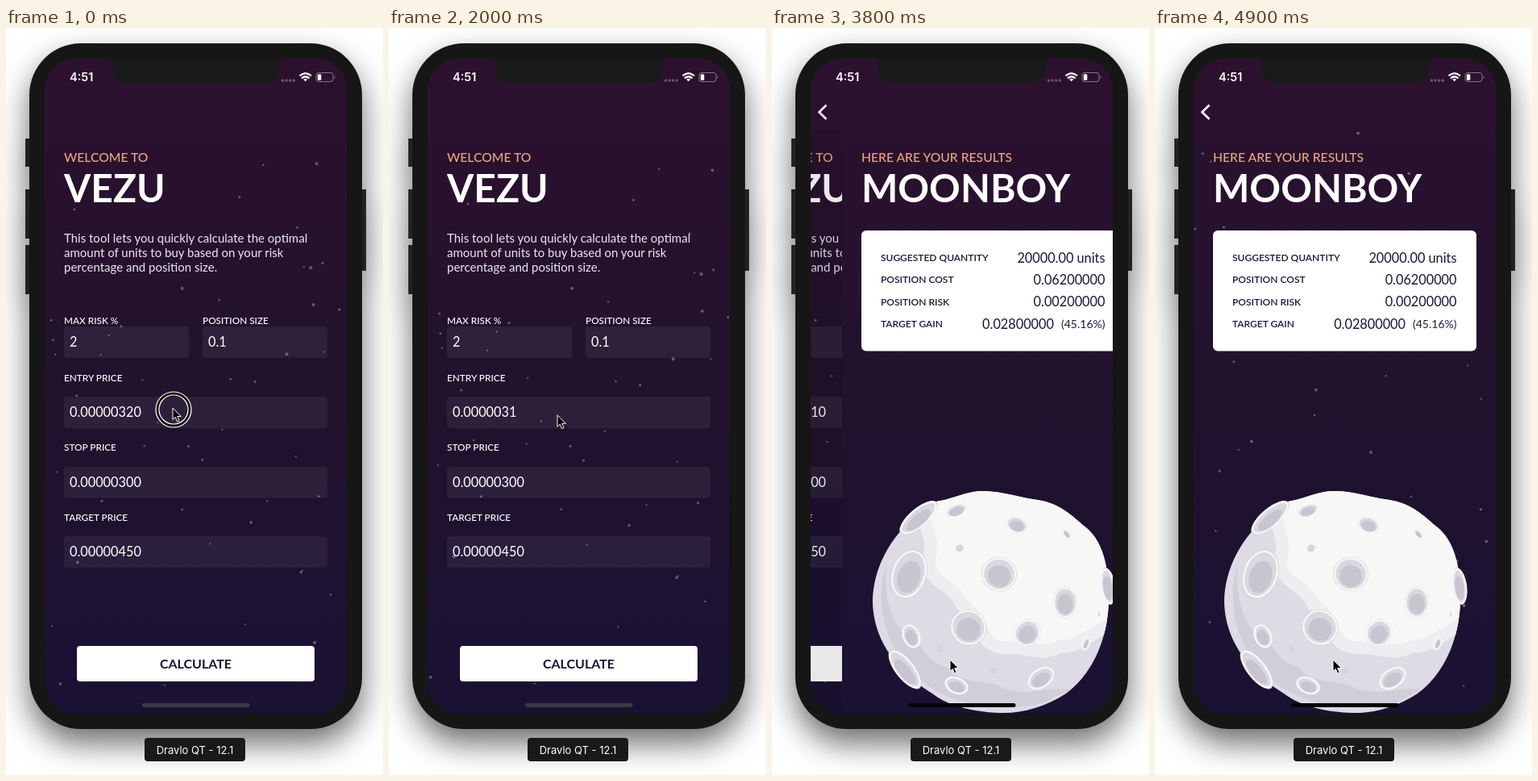
Animation of 468 by 926 pixels, one loop 5000 ms. Source, as an HTML page:

```html
<!DOCTYPE html>
<html lang="en">
<head>
<meta charset="utf-8">
<title>Position calculator</title>
<style>
html, body { margin: 0; width: 100%; height: 100%; overflow: hidden; background: #fff; }
svg { display: block; width: 468px; height: 926px; font-family: Lato, "Open Sans", sans-serif; fill: #fff; }
.system { font-family: Inter, Roboto, sans-serif; }
.intro { font-size: 15.7px; font-weight: 500; fill: #e9a583; }
.title { font-size: 48px; font-weight: 700; }
.body { font-size: 15px; fill: #ebe7ee; }
.label { font-size: 11.8px; font-weight: 500; }
.value { font-size: 16.3px; }
.field { fill: #fff; fill-opacity: .06; }
.card text { fill: #211438; }
.card .label { font-size: 12px; font-weight: 600; }
.stars { fill: none; stroke: #fff; stroke-opacity: .3; stroke-linecap: round; }
.end { text-anchor: end; }
.mid { text-anchor: middle; }
</style>
</head>
<body>
<svg viewBox="0 0 468 926">
  <defs>
    <linearGradient id="night" gradientUnits="userSpaceOnUse" x1="0" y1="38" x2="0" y2="850">
      <stop offset="0" stop-color="#2d112f"/>
      <stop offset=".5" stop-color="#21122d"/>
      <stop offset="1" stop-color="#1a1134"/>
    </linearGradient>
    <filter id="shadow" x="-30%" y="-20%" width="160%" height="140%">
      <feDropShadow dx="0" dy="18" stdDeviation="19" flood-opacity=".58"/>
    </filter>
    <clipPath id="screen"><rect x="48" y="38" width="375" height="812" rx="38"/></clipPath>
    <clipPath id="content"><rect x="48" y="126" width="375" height="724"/></clipPath>
    <path id="globe" d="M226 574C250 575 268 582 291 585C318 589 334 605 348 617C366 630 374 652 377 674L379 712C377 762 357 802 326 825C300 842 270 850 245 849C215 848 182 842 160 825C118 800 87 760 86 712C86 680 99 648 122 622C132 603 150 590 170 586C190 582 205 573 226 574Z"/>
    <clipPath id="disc"><use href="#globe"/></clipPath>
  </defs>

  <g filter="url(#shadow)">
    <path fill="#232323" d="M24 137h8v35h-8zM24 200h8v61h-8zM24 269h8v61h-8zM439 200h8v101h-8z"/>
    <rect x="29" y="19" width="413" height="850" rx="64" fill="#191919"/>
  </g>

  <g clip-path="url(#screen)">
    <rect x="48" y="38" width="375" height="812" fill="url(#night)"/>
    <g clip-path="url(#content)">
      <g id="form">
        <g class="stars" id="formStars"></g>
        <text class="intro" x="72" y="165.5">WELCOME TO</text>
        <text class="title" x="72" y="216">VEZU</text>
        <g class="body">
          <text x="72" y="266">This tool lets you quickly calculate the optimal</text>
          <text x="72" y="284">amount of units to buy based on your risk</text>
          <text x="72" y="301.5">percentage and position size.</text>
        </g>
        <g id="fields"></g>
        <rect x="88" y="766" width="295" height="44" rx="4"/>
        <text id="press" class="mid" x="235.5" y="793.7" font-size="16" font-weight="700" fill="#1f1235">CALCULATE</text>
      </g>
      <rect id="dim" x="48" y="126" width="375" height="724" fill="#000"/>
      <g id="result">
        <rect x="48" y="126" width="375" height="724" fill="url(#night)"/>
        <g class="stars" id="resultStars"></g>
        <text class="intro" x="72" y="165.5">HERE ARE YOUR RESULTS</text>
        <text class="title" x="72" y="216">MOONBOY</text>
        <g class="card" id="card"><rect x="72" y="251" width="327" height="149.5" rx="6"/></g>
        <use href="#globe" fill="#dddbe4"/>
        <g clip-path="url(#disc)">
          <path fill="#d1cedb" d="M108 640C94 690 106 738 132 756C152 764 150 786 178 792C196 816 226 806 248 818C275 830 300 816 330 820L300 836C240 852 180 836 150 812C110 780 94 740 97 690Z"/>
          <path fill="#f7f7f5" stroke="#eeeef0" stroke-width="16" d="M146 560C140 610 166 630 156 655C152 690 185 686 197 715C222 728 216 764 246 768C275 765 290 780 318 767C345 768 356 748 400 730V560Z"/>
        </g>
        <g id="craters"></g>
      </g>
    </g>
    <path id="back" d="M67.5 95.5L58.5 104.3L67.5 113" fill="none" stroke="#fff" stroke-width="2.7"/>
    <rect id="home" x="169" y="837" width="133.5" height="5" rx="2.5"/>
  </g>

  <path fill="#191919" d="M124 37Q131 38 131 46V48A20 20 0 0 0 151 68.5H320A20 20 0 0 0 340 48V46Q340 38 347 37Z"/>
  <text class="system" x="79" y="66" font-size="14.5" font-weight="600">4:51</text>
  <path d="M343.5 65H358" stroke="#fff" stroke-opacity=".3" stroke-width="3.4" stroke-linecap="round" stroke-dasharray="0 4.6"/>
  <g fill="none" stroke="#fff" stroke-width="2.2">
    <path d="M364.5 59.3Q371.7 52.8 379 59.3M367 62.3Q371.7 58.2 376.5 62.3"/>
    <path d="M369.3 63.8Q371.7 61.8 374.1 63.8L371.7 66.3Z" fill="#fff" stroke="none"/>
  </g>
  <rect x="385" y="55.5" width="21" height="11" rx="3" fill="none" stroke="#fff" stroke-opacity=".42"/>
  <rect x="386.8" y="57.3" width="4.5" height="7.4" rx="1.3"/>
  <path d="M407.5 59q2 2 0 4z" fill-opacity=".45"/>

  <rect x="172" y="880" width="125" height="29" rx="4" fill="#191919"/>
  <text class="system mid" x="234.5" y="900" font-size="13">Dravlo QT - 12.1</text>

  <g id="ring" fill="none">
    <circle cx="208" cy="473" r="20" stroke="#111" stroke-width="3.5"/>
    <circle cx="208" cy="473" r="22" stroke="#fff" stroke-width="1.2"/>
    <circle cx="208" cy="473" r="18" stroke="#fff" stroke-width="1.2"/>
  </g>
  <path id="cursor" d="M0 0V14.5L3.3 11.4L5.5 17L8 15.9L5.7 10.5H10.4Z" fill="#000" stroke="#fff"/>
</svg>

<script>
const el = id => document.getElementById(id);
const set = (id, name, value) => el(id).setAttribute(name, value);
const text = (cls, x, y, s, extra = "") => `<text class="${cls}" x="${x}" y="${y}" ${extra}>${s}</text>`;

function random(seed) {
  return () => (seed = (seed * 16807) % 2147483647) / 2147483647;
}

function stars(seed, count) {
  const rnd = random(seed);
  return Array.from({ length: count }, () =>
    `<path d="M${45 + 380 * rnd()} ${130 + 700 * rnd()}h0" stroke-width="${2.2 + 2 * rnd() ** 2}"/>`).join("");
}
el("formStars").innerHTML = stars(4511, 52);
el("resultStars").innerHTML = stars(7723, 46);

function field(x, y, w, label, value, gap = 19.5, extra = "") {
  el("fields").innerHTML += text("label", x, y - gap, label) +
    `<rect class="field" x="${x}" y="${y}" width="${w}" height="39" rx="4"/>` +
    text("value", x + 7, y + 25.3, value, extra);
}
field(72, 370, 155, "MAX RISK %", "2", 3.5);
field(244, 370, 155, "POSITION SIZE", "0.1", 3.5);
["ENTRY", "STOP", "TARGET"].forEach((name, i) =>
  field(72, 457 + i * 86.5, 327, name + " PRICE", ["", "0.00000300", "0.00000450"][i], 19.5, `id="${name}"`));

el("card").innerHTML += [
  ["SUGGESTED QUANTITY", "20000.00 units"],
  ["POSITION COST", "0.06200000"],
  ["POSITION RISK", "0.00200000"],
  ["TARGET GAIN", "0.02800000"]
].map(([label, value], i) =>
  text("label", 96, 289 + i * 27.3, label) +
  text("value end", i < 3 ? 374.5 : 311, 290.7 + i * 27.3, value)).join("") +
  text("end", 374.5, 372, "(45.16%)", 'font-size="14"');

// Craters flatten toward the edge of the globe, as on a sphere.
function crater([x, y, r]) {
  const dx = x - 232, dy = y - 712;
  const squash = Math.sqrt(Math.max(.14, 1 - (dx * dx + dy * dy) / 146 ** 2));
  const turn = Math.atan2(dy, dx) * 180 / Math.PI;
  const oval = (k, attrs, drop = 0) =>
    `<ellipse rx="${r * squash * k}" ry="${r * k}" transform="translate(${x} ${y + drop}) rotate(${turn})" ${attrs}/>`;
  if (r < 6) return oval(1, 'fill="#d6d4dd"');
  return oval(1.1, 'fill="#d6d4de"') +
    oval(1, 'fill="#d9d8de" stroke="#f6f6f6" stroke-width="2.5"') +
    oval(.7, 'fill="#c8c5d0"', r * .12);
}
el("craters").innerHTML = [
  [143, 607, 27], [126, 795, 27], [378, 692, 21],
  [131, 677, 29], [243, 677, 20], [205, 743, 21], [190, 598, 13], [265, 616, 13], [325, 712, 18],
  [278, 750, 16], [134, 754, 14], [190, 815, 14], [295, 806, 17], [351, 763, 8], [327, 627, 7],
  [194, 645, 5], [169, 769, 5], [236, 797, 5], [367, 727, 3]
].map(crater).join("");

const clamp = v => Math.max(0, Math.min(1, v));
const smooth = v => v * v * (3 - 2 * v);
const spin = ms => `rotate(${1.416 * ms / 1000} 226 492)`;

// Two characters are deleted, then two are typed, one every 200 ms.
function entry(t) {
  const step = Math.max(0, Math.min(4, Math.floor((t - 1300) / 200)));
  return step < 3 ? "0.00000320".slice(0, 10 - step) : "0.00000310".slice(0, 6 + step);
}

function draw(t) {
  // Critically damped push from one page to the next.
  const s = Math.max(0, t - 3605) * .0197;
  const left = (1 + s) * Math.exp(-s), done = 1 - left;
  const pushed = s > 0;
  const move = smooth(clamp((t - 1900) / 1000));

  set("form", "transform", `translate(${-112.5 * done} 0)`);
  set("dim", "opacity", .1 * done);
  set("result", "transform", `translate(${375 * left} 0)`);
  set("result", "visibility", pushed ? "visible" : "hidden");
  set("back", "opacity", done);
  set("home", "fill", pushed ? "#050407" : "#403a46");
  set("formStars", "transform", spin(t));
  set("resultStars", "transform", spin(t - 4900));
  set("resultStars", "opacity", clamp((t - 4200) / 500));
  set("press", "opacity", t >= 3500 ? .22 : 1);
  set("ring", "visibility", t < 300 ? "visible" : "hidden");
  set("cursor", "transform", `translate(${207 + 14 * move + 18 * Math.sin(Math.PI * move)} ${471 + 312 * move})`);
  el("ENTRY").textContent = entry(t);
}

let start;
function tick(now) {
  start ??= now;
  draw(Math.floor((now - start) % 5000 / 100) * 100);
  requestAnimationFrame(tick);
}
draw(0);
requestAnimationFrame(tick);
</script>
</body>
</html>
```
